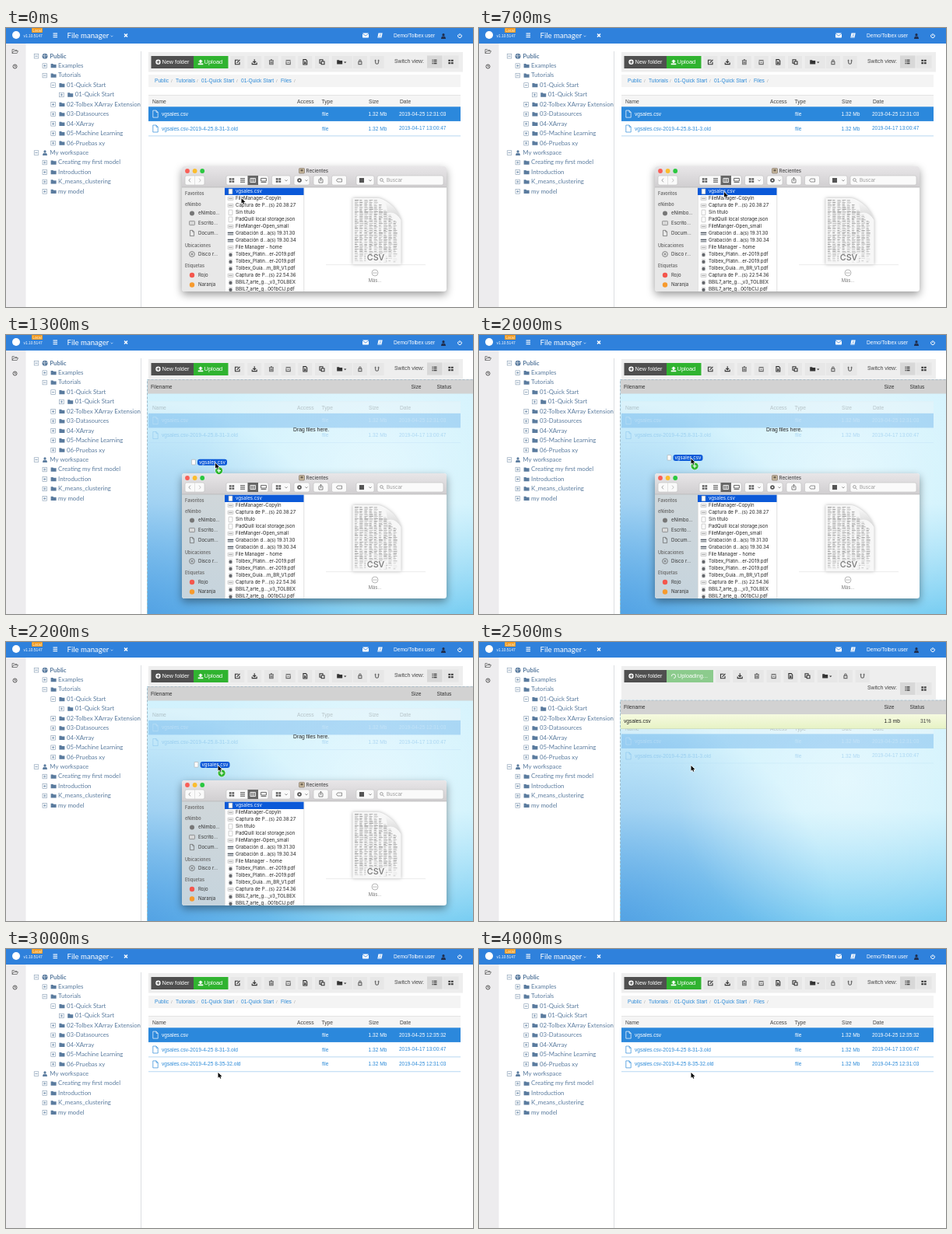
These frames come from a looping animation (600 by 359 pixels, 4.1 s). An HTML page with a canvas:

```html
<!DOCTYPE html>
<html lang="en">
<head>
<meta charset="utf-8">
<title>File manager upload</title>
<style>
html, body { margin: 0; width: 100%; height: 100%; overflow: hidden; background: #fff; }
canvas { display: block; width: 600px; height: 359px; }
</style>
</head>
<body>
<canvas id="stage"></canvas>
<script>
const W = 600, H = 359, LOOP = 4100, STEP = 100;
const GRAB = 800, OVERLAY = 1300, DROP = 2500, DONE = 3000;
const SANS = '"Liberation Sans", Arial, sans-serif';
const LATO = 'Lato, sans-serif';
const UI = 'Inter, sans-serif';
const BLUE = '#2f81dc', LINK = '#2c8ad8', TREE = '#5a7b9e';

const canvas = document.getElementById('stage');
const dpr = window.devicePixelRatio || 1;
canvas.width = W * dpr;
canvas.height = H * dpr;
const c = canvas.getContext('2d');

function rect(x, y, w, h, fill) {
  c.fillStyle = fill;
  c.fillRect(x, y, w, h);
}

function round(x, y, w, h, r, fill, stroke) {
  c.beginPath();
  c.roundRect(x, y, w, h, r);
  if (fill) { c.fillStyle = fill; c.fill(); }
  if (stroke) { c.strokeStyle = stroke; c.lineWidth = 0.6; c.stroke(); }
}

function dot(x, y, r, fill) {
  c.beginPath();
  c.arc(x, y, r, 0, 7);
  c.fillStyle = fill;
  c.fill();
}

function fade(y0, y1, ...colors) {
  const g = c.createLinearGradient(0, y0, 0, y1);
  colors.forEach((col, i) => g.addColorStop(i / (colors.length - 1), col));
  return g;
}

function text(s, x, y, size, color, font = SANS, weight = 400, align = 'left') {
  c.font = `${weight} ${size}px ${font}`;
  c.fillStyle = color;
  c.textAlign = align;
  c.textBaseline = 'middle';
  c.fillText(s, x, y);
}

// Paths are centred on 0,0
function icon(path, x, y, color, { fill = false, scale = 1, width = 0.9 } = {}) {
  const p = new Path2D(path);
  c.save();
  c.translate(x, y);
  c.scale(scale, scale);
  c.fillStyle = c.strokeStyle = color;
  c.lineWidth = width;
  if (fill) c.fill(p); else c.stroke(p);
  c.restore();
}

const ICON = {
  edit: 'M1 -2.5H-3V3H2.5V0M-1 1L3 -3',
  download: 'M0 -3.5V1M-2 -1L0 1L2 -1M-3 .8V2.8H3V.8',
  trash: 'M-2.2 -1.8V3H2.2V-1.8M-3 -2H3M-1 -3H1M-.8 -.5V2M.8 -.5V2',
  archive: 'M-3 -2.2H3M-2.6 -1V2.8H2.6V-1M-1 .4H1',
  sheet: 'M-2.4 -3.2H1L2.4 -1.6V3.2H-2.4ZM-1 -.5L1 2M1 -.5L-1 2',
  copy: 'M1 -1V-3H-3V1.5H-1M-.8 -.8H3V3H-.8Z',
  folder: 'M-3.5 -2.6H-.8L0 -1.7H3.5V2.7H-3.5Z',
  open: 'M-3.5 2.5V-2.5H-1L0 -1.5H2.5V-.3M-3.5 2.5L-2 -.3H4L2.6 2.5Z',
  lock: 'M-2 -.3H2V2.8H-2ZM-1.2 -.3V-2Q0 -3.6 1.2 -2V-.3',
  magnet: 'M-2 -3V0Q-2 2.5 0 2.5Q2 2.5 2 0V-3M-3 -1.8H-1M1 -1.8H3',
  upload: 'M-1.2 1V-.8H-3L0 -3.6L3 -.8H1.2V1ZM-3.3 1.6H3.3V3.2H-3.3Z',
  doc: 'M-3.2 -4.5H1L3.2 -2.2V4.5H-3.2ZM1 -4.5V-2.2H3.2',
  list: 'M-3 -2.2H-1.8M-1 -2.2H3M-3 0H-1.8M-1 0H3M-3 2.2H-1.8M-1 2.2H3',
  grid: 'M-3.2 -2.8H-.4V-.4H-3.2ZM.4 -2.8H3.2V-.4H.4ZM-3.2 .4H-.4V2.8H-3.2ZM.4 .4H3.2V2.8H.4Z',
  user: 'M0 -3.4A1.6 1.8 0 1 1 0 .2A1.6 1.8 0 1 1 0 -3.4ZM-3 3.4Q-3 .4 -1.2 .2L0 1L1.2 .2Q3 .4 3 3.4Z',
  cursor: 'M0 0V8L1.9 6.3L3.1 9L4.5 8.4L3.3 5.8H5.8Z'
};

function header() {
  rect(0, 0, W, 20, BLUE);
  dot(13, 9, 5, '#fff');
  text('v1.10.5147', 22.5, 10.5, 4.9, '#fff');
  round(33, 0, 14, 6, 1, '#f39a1e');
  text('Local', 40, 3.2, 4.8, '#fff', SANS, 400, 'center');
  for (let i = 0; i < 3; i++) rect(60.5, 6.5 + i * 2.3, 5.5, 1.1, '#fff');
  text('File manager', 78.5, 9.6, 9.6, '#fff', LATO);
  icon('M-1.4 -.7L0 .7L1.4 -.7', 136, 10.5, '#fff', { width: 0.6 });
  icon('M-2 -2L2 2M2 -2L-2 2', 154, 9.5, '#fff', { width: 1.5 });
  round(458, 6.5, 8, 6, 0.8, '#fff');
  icon('M-4 -2L0 1.2L4 -2', 462, 9, BLUE, { width: 0.8 });
  icon('M-2 -3H3.2L2 3H-3.2Z', 480.5, 9.5, '#fff', { fill: true });
  icon('M-.7 -1.4H1.8M-1 0H1.5M-2.4 1.8H2', 480.5, 9.5, BLUE, { width: 0.5 });
  text('Demo/Tolbex user', 498, 10.5, 6.6, '#fff');
  icon(ICON.user, 562, 10.5, '#1f2d4d', { fill: true });
  icon('M-1.5 -1.7A2.4 2.4 0 1 0 1.5 -1.7M0 -3V0', 583, 10, '#fff', { width: 1 });
}

const tree = [
  [0, 'Public', '-'], [1, 'Examples', '+'], [1, 'Tutorials', '-'],
  [2, '01-Quick Start', '-'], [3, '01-Quick Start', '+'],
  [2, '02-Tolbex XArray Extension', '+'], [2, '03-Datasources', '+'],
  [2, '04-XArray', '+'], [2, '05-Machine Learning', '+'], [2, '06-Pruebas xy', '+'],
  [0, 'My workspace', '-'], [1, 'Creating my first model', '+'],
  [1, 'Introduction', '+'], [1, 'K_means_clustering', '+'], [1, 'my model', '+']
];

function sidebar() {
  rect(0, 20, 25.5, H - 20, '#edecee');
  icon(ICON.open, 11.5, 30, '#555', { width: 0.7 });
  icon('M0 -2.5A2.5 2.5 0 1 1 0 2.5A2.5 2.5 0 1 1 0 -2.5M0 -1.4V.2H1', 11.5, 49.5, '#444', { width: 0.9 });
  rect(173, 30, 1, H - 30, '#dcdfe2');
  tree.forEach(([level, name, sign], i) => {
    const x = 39 + level * 10.8, y = 36.2 + i * 12.44;
    c.strokeStyle = '#8198b0';
    c.lineWidth = 0.6;
    c.strokeRect(x - 2.8, y - 2.8, 5.6, 5.6);
    icon(sign === '+' ? 'M-1.6 0H1.6M0 -1.6V1.6' : 'M-1.6 0H1.6', x, y, TREE, { width: 0.7 });
    if (name === 'Public') {
      dot(x + 11, y, 3.5, TREE);
      icon('M-3 -1Q0 1 3 -1M0 -3Q-2 0 0 3', x + 11, y, '#fff', { width: 0.5 });
    } else if (level === 0) icon(ICON.user, x + 11, y, TREE, { fill: true });
    else icon(ICON.folder, x + 11.3, y, TREE, { fill: true });
    text(name, x + 17.3, y, 7.8, TREE, LATO, name === 'Public' ? 700 : 400);
  });
}

function toolbar(busy, t) {
  rect(183, 31, 404, busy ? 43 : 25.5, '#eeeeee');
  rect(186.5, 36, 54.5, 16, '#4f4f4f');
  dot(195.5, 43.8, 3.2, '#fff');
  icon('M-2 0H2M0 -2V2', 195.5, 43.8, '#4f4f4f', { width: 1 });
  text('New folder', 200.5, 44, 7.3, '#fff');
  rect(241, 36, busy ? 60 : 44.5, 16, busy ? '#8ccb8d' : '#30b330');
  if (busy) {
    const a = t / 160;
    c.beginPath();
    c.arc(250, 44, 2.6, a, a + 4.8);
    c.strokeStyle = '#fff';
    c.lineWidth = 0.9;
    c.stroke();
    text('Uploading...', 255, 44, 7.3, '#fff');
  } else {
    icon(ICON.upload, 250, 44, '#fff', { fill: true });
    text('Upload', 254.5, 44, 7.5, '#fff');
  }
  const dx = busy ? 16 : 0;
  ['edit', 'download', 'trash', 'archive', 'sheet', 'copy', 'folder', 'lock', 'magnet'].forEach((name, i) => {
    const wide = name === 'folder';
    const x = 297.5 + i * 21.7 + dx + (i > 6 ? 5.5 : 0);
    rect(x - 9, 36, wide ? 26 : 18, 16, '#e7e7e7');
    const color = /trash|archive|lock|magnet/.test(name) ? '#666' : '#333';
    icon(ICON[name], x + (wide ? 1 : 0), 43.8, color, { fill: wide, width: 1.1 });
    if (wide) icon('M-1.7 -.8H1.7L0 1Z', x + 8, 44.3, color, { fill: true });
  });
  const y = busy ? 60 : 43.5;
  text('Switch view:', 499, y - 0.5, 6.9, '#444');
  rect(541, y - 8, 19.5, 16, '#d8d8d8');
  rect(561.5, y - 8, 20, 16, '#e6e6e6');
  icon(ICON.list, 550.5, y, '#333', { width: 1.2 });
  icon(ICON.grid, 571.5, y, '#444', { fill: true });
}

function crumbs() {
  rect(183, 60, 401, 16, '#f4f4f4');
  const items = [['Public', 191], ['Tutorials', 218], ['01-Quick Start', 251], ['01-Quick Start', 302], ['Files', 353]];
  items.forEach(([s, x], i) => {
    text(s, x, 68.3, 6.6, LINK);
    text('/', [213, 246, 297, 348, 371][i] - 1, 68.3, 6.2, '#aaa');
  });
}

function table(done, dy) {
  const rows = [['vgsales.csv', done ? '2019-04-25 12:35:32' : '2019-04-25 12:31:03'],
    [done ? 'vgsales.csv-2019-4-25 8-31-3.old' : 'vgsales.csv-2019-4-25.8-31-3.old', '2019-04-17 13:00:47']];
  if (done) rows.push(['vgsales.csv-2019-4-25 8-35-32.old', '2019-04-25 12:31:03']);
  rect(183, 86 + dy, 401, 15.5, '#f5f5f5');
  rect(183, 86 + dy, 401, 0.7, '#ddd');
  [['Name', 188], ['Access', 374], ['Type', 405.5], ['Size', 466], ['Date', 506]]
    .forEach(([s, x]) => text(s, x, 95 + dy, 6.7, '#444'));
  rows.forEach(([name, date], i) => {
    const y = 110.6 + i * 18.9 + dy, color = i ? LINK : '#fff';
    if (i) rect(183, y + 9, 401, 0.8, '#a5cdee');
    else rect(183, y - 9.3, 401, 18.6, '#2b88dc');
    icon(ICON.doc, 192, y, color, { width: 0.7 });
    text(name, 200, y + 0.2, 6.6, color);
    text('file', 406, y + 0.2, 6.6, color);
    text('1.32 Mb', 465.5, y + 0.2, 6.6, color);
    text(date, 505, y + 0.2, 6.5, color);
  });
}

function glow(x, y, r, rgb, a) {
  const g = c.createRadialGradient(x, y, 0, x, y, r);
  g.addColorStop(0, `rgba(${rgb},${a})`);
  g.addColorStop(1, `rgba(${rgb},0)`);
  rect(182, 57, 418, 302, g);
}

function overlay(busy, t) {
  const dy = busy ? 17.5 : 0;
  c.save();
  c.beginPath();
  c.rect(181, 57 + dy, 419, H);
  c.clip();
  rect(181, 57, 419, 302, fade(75, H, '#d2f2fd', '#ccf1fc', '#78cdf2'));
  glow(170, 375, 290, '62,138,220', 0.68);
  glow(470, 180, 220, '255,255,255', 0.45);
  c.globalAlpha = 0.27;
  table(false, dy - 0.5);
  c.globalAlpha = 1;
  rect(182, 57 + dy, 418, 18.5, '#d2d2d2');
  [['Filename', 186], ['Size', 520.5], ['Status', 553.5]]
    .forEach(([s, x]) => text(s, x, 67 + dy, 6.7, '#333'));
  if (busy) {
    const pct = Math.min(100, 31 + 23 * (t - DROP) / STEP);
    rect(182, 93, 418, 18.5, fade(93, 112, '#f6fae0', '#e6f2c4'));
    rect(182, 111, 418, 0.7, '#cbd8b4');
    text('vgsales.csv', 186, 102.5, 6.7, '#222');
    text('1.3 mb', 520.5, 102.5, 6.7, '#222');
    text(pct + '%', 567, 102.5, 6.7, '#444');
  } else text('Drag files here.', 369, 122, 6.8, '#222');
  c.setLineDash([3, 2]);
  c.strokeStyle = '#9fb5c2';
  c.lineWidth = 0.9;
  c.strokeRect(181.5, 57.4 + dy, 430, 320);
  c.restore();
}

const files = ['vgsales.csv', 'FileManager-CopyIn', 'Captura de P...(s) 20.38.27', 'Sin título',
  'PadQuill local storage.json', 'FileManger-Open_small', 'Grabación d...a(s) 19.31.30',
  'Grabación d...a(s) 19.30.34', 'File Manager - home', 'Tolbex_Platin...er-2019.pdf',
  'Tolbex_Platin...er-2019.pdf', 'Tolbex_Guia...m_BR_V1.pdf', 'Captura de P...(s) 22.54.36',
  'BBIL7_arte_g..._v3_TOLBEX', 'BBIL7_arte_g...001bClJ.pdf'];

function fileIcon(x, y, name) {
  if (/pdf|BBIL7/.test(name)) {
    rect(x - 2.4, y - 3.4, 4.8, 6.8, '#e2e2e2');
    dot(x, y + 0.5, 2.1, '#63666b');
  } else if (/Grab/.test(name)) {
    rect(x - 3.7, y - 2.2, 7.4, 4.4, '#d5d8dc');
    rect(x - 3.7, y - 1.6, 7.4, 1.2, '#555d66');
    rect(x - 3.7, y + 0.9, 7.4, 1, '#70777f');
  } else if (/Capt|File/.test(name)) {
    round(x - 3.5, y - 2.2, 7, 4.4, 0.4, '#f0f0f0', '#bbb');
    rect(x - 2.3, y - 0.5, 4.6, 0.9, '#999');
  } else round(x - 2.4, y - 3.3, 4.8, 6.6, 0.4, '#fff', '#aaa');
}

function preview() {
  c.save();
  c.shadowColor = 'rgba(0,0,0,.3)';
  c.shadowBlur = 4 * dpr;
  icon('M-30 -43H4Q24 -36 32 -15V42H-30Z', 475.5, 262, '#f7f7f7', { fill: true });
  c.restore();
  let seed = 7;
  const rnd = () => (seed = seed * 16807 % 2147483647) / 2147483647;
  for (let y = 221; y < 302; y += 1.5) {
    for (let k = 0; k < 9; k++) {
      const x = 448 + k * 6.2;
      if (x > 474 + (y - 221) * 0.9) continue;
      const v = 145 + rnd() * 60 + Math.max(0, y - 284) * 3 | 0;
      rect(x, y, 2.6 + rnd() * 2.8, 0.8, `rgb(${v},${v},${v})`);
    }
  }
  icon('M4 -43Q15 -38 14 -24Q25 -27 32 -15Q24 -36 4 -43Z', 475.5, 262, fade(-43, -15, '#fff', '#d2d2d2'), { fill: true });
  rect(462, 290.5, 26, 10.5, 'rgba(248,248,248,.85)');
  text('CSV', 475, 295.8, 10.8, '#777', UI, 500, 'center');
  rect(411, 304.5, 128, 0.6, '#ddd');
  icon('M0 -4A4 4 0 1 1 0 4A4 4 0 1 1 0 -4', 474, 315, '#888', { width: 0.6 });
  for (let i = -1; i < 2; i++) dot(474 + i * 1.9, 315, 0.6, '#777');
  text('Más...', 474, 325.5, 5.8, '#777', UI, 400, 'center');
}

function sideList(tinted) {
  rect(226, 205, 55, 134, tinted ? fade(205, 339, '#d0d7da', '#c6d4dd') : '#e8e8e8');
  [['Favoritos', 213], ['eNimbo', 227], ['Ubicaciones', 280], ['Etiquetas', 306.5]]
    .forEach(([s, y]) => text(s, 230, y, 5.5, '#6c6c6c', UI, 600));
  [['eNimbo...', 238.5], ['Escrito...', 251], ['Docum...', 264], ['Disco r...', 291], ['Rojo', 318], ['Naranja', 330.5]]
    .forEach(([s, y], i) => {
      text(s, 247, y, 6.1, '#333', UI);
      if (i > 3) dot(239, y, 3.2, i === 4 ? '#f4564d' : '#f79a2d');
      else if (i === 0) dot(239, y, 3, '#777');
      else if (i === 2) icon(ICON.doc, 239, y, '#666', { scale: 0.8 });
      else if (i === 3) icon('M0 -3.4A3.4 3.4 0 1 1 0 3.4A3.4 3.4 0 1 1 0 -3.4M0 -1A1 1 0 1 1 0 1A1 1 0 1 1 0 -1', 239, y, '#666', { width: 0.8 });
      else round(235.5, y - 2.6, 7, 5.2, 0.8, '#d8d8d8', '#666');
    });
}

function finder(tinted) {
  c.save();
  c.shadowColor = 'rgba(0,0,0,.4)';
  c.shadowBlur = 11 * dpr;
  c.shadowOffsetY = 4 * dpr;
  round(226, 178, 340, 161, 3.5, '#fff');
  c.restore();
  c.save();
  c.beginPath();
  c.roundRect(226, 178, 340, 161, 3.5);
  c.clip();
  rect(226, 178, 340, 27, fade(178, 205, '#e8e6e8', '#d0ced0'));
  sideList(tinted);

  ['#f95f57', '#fbbd2e', '#2bc840'].forEach((col, i) => dot(233 + i * 9.6, 184, 2.9, col));
  round(376.5, 180.5, 7, 6.5, 1, '#c6b69b', '#766b5c');
  rect(378.5, 182, 3, 2.4, '#6d6254');
  text('Recientes', 385.5, 184.2, 6.2, '#333', UI);
  [[230, 25], [283, 54], [341.5, 24], [370, 20], [395, 19], [418.5, 19], [450, 23], [477, 85]]
    .forEach(([x, w]) => round(x, 190, w, 12, 2, '#fafafa', '#bfbfbf'));
  rect(242.3, 190, 0.6, 12, '#d0d0d0');
  rect(310.5, 190, 13.5, 12, '#666');
  icon('M1 -2.4L-1.2 0L1 2.4', 236, 196, '#999');
  icon('M-1 -2.4L1.2 0L-1 2.4', 249, 196, '#bbb');
  icon(ICON.grid, 290, 196, '#555', { fill: true });
  icon('M-3 -2.5H3M-3 -.8H3M-3 .9H3M-3 2.6H3', 304, 196, '#555', { width: 0.8 });
  icon('M-3.3 -2.6H3.3V2.6H-3.3ZM-1.1 -2.6V2.6M1.1 -2.6V2.6', 317.2, 196, '#fff');
  icon('M-3.4 -2.6H3.4V1H-3.4ZM-3.4 2.6H3.4', 331, 196, '#555');
  icon(ICON.grid, 350, 196, '#555', { fill: true });
  dot(377, 196, 2.8, '#555');
  dot(377, 196, 1.1, '#fafafa');
  icon('M-1 -1.2H-2.5V3H2.5V-1.2H1M0 1V-3.7M-1.5 -2.2L0 -3.7L1.5 -2.2', 404.5, 196, '#555', { width: 0.7 });
  icon('M-3.5 0L-2 -2H3.5V2H-2Z', 428, 196, '#666', { width: 0.7 });
  rect(454, 193, 6, 6, '#555');
  [360, 386, 468].forEach(x => icon('M-1.5 -.6L0 .9L1.5 -.6', x, 196, '#555', { width: 0.7 }));
  icon('M-.6 -2.4A1.8 1.8 0 1 1 -.6 1.2A1.8 1.8 0 1 1 -.6 -2.4M.8 .9L2.6 2.7', 483, 196, '#777', { width: 0.7 });
  text('Buscar', 489, 196.3, 6.2, '#999', UI);
  rect(226, 204.6, 340, 0.7, '#b5b5b5');

  rect(281, 205.5, 0.6, 134, '#d2d2d2');
  rect(382.5, 205.5, 0.7, 134, '#cfcfcf');
  rect(281, 205.7, 101.5, 9.3, '#0b59d8');
  files.forEach((name, i) => {
    const y = 210.4 + i * 9;
    fileIcon(288.5, y, name);
    text(name, 295, y, 6.1, i ? '#222' : '#fff', UI);
  });
  preview();
  c.restore();
}

// The drag gathers speed until it leaves the window, then settles
const smooth = u => u * u * (3 - 2 * u);
const speedUp = u => u ** 1.5;
const settle = u => 1 - (1 - u) ** 2;
const path = [[0, 302.5, 219], [600, 315, 211, smooth], [GRAB, 315, 211, smooth],
  [OVERLAY, 269, 164.8, speedUp], [1900, 272.5, 159, settle], [LOOP, 272.5, 159, smooth]];

function pointer(t) {
  const i = path.findIndex(p => p[0] > t);
  const [t0, x0, y0] = path[i - 1], [t1, x1, y1, ease] = path[i];
  const e = ease((t - t0) / (t1 - t0));
  return [x0 + (x1 - x0) * e, y0 + (y1 - y0) * e];
}

function drawPointer(t) {
  const [x, y] = pointer(t);
  if (t > GRAB && t < DROP) {
    fileIcon(x - 28, y - 1.2, '');
    round(x - 23, y - 5, 38, 8, 3, '#0b59d8');
    text('vgsales.csv', x - 21, y - 0.8, 6.1, '#fff', UI);
    if (t >= OVERLAY) {
      dot(x + 4.6, y + 9.8, 5, '#fff');
      dot(x + 4.6, y + 9.8, 4.6, '#2db52d');
      icon('M-2.4 0H2.4M0 -2.4V2.4', x + 4.6, y + 9.8, '#fff', { width: 1.1 });
    }
  }
  icon(ICON.cursor, x, y, '#fff', { width: 1.4, scale: 0.85 });
  icon(ICON.cursor, x, y, '#000', { fill: true, scale: 0.85 });
}

function draw(now) {
  const t = Math.floor(now % LOOP / STEP) * STEP;
  const busy = t >= DROP && t < DONE;
  const over = t >= OVERLAY && t < DONE;
  c.setTransform(dpr, 0, 0, dpr, 0, 0);
  rect(0, 0, W, H, '#fff');
  sidebar();
  header();
  toolbar(busy, t);
  if (over) overlay(busy, t);
  else {
    crumbs();
    table(t >= DONE, 0);
  }
  if (t < DROP) finder(over);
  drawPointer(t);
}

const start = performance.now();
function tick() {
  draw(performance.now() - start);
  requestAnimationFrame(tick);
}
tick();
</script>
</body>
</html>
```
